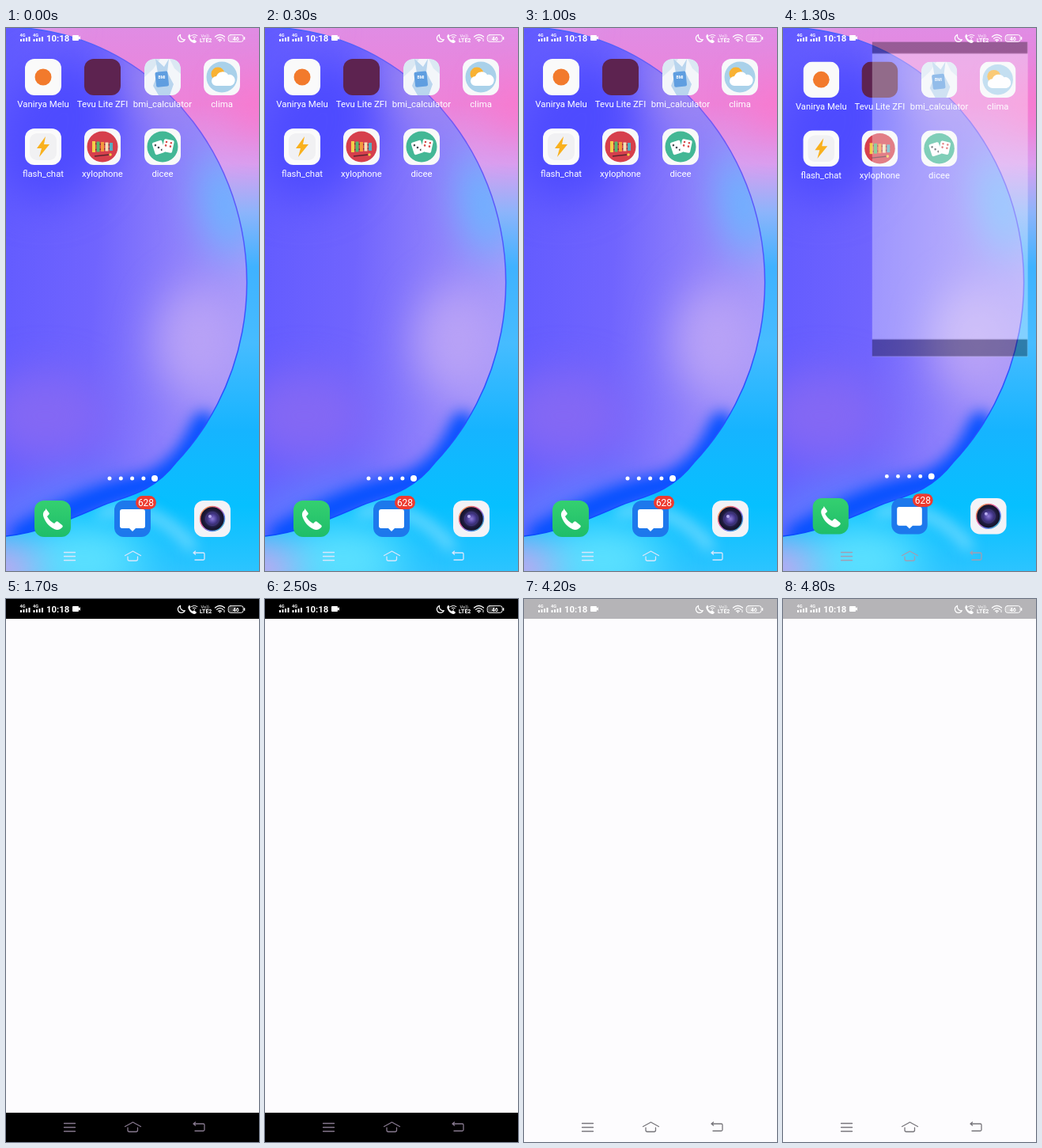
An HTML page for the animation above (5000 ms loop, 320 px wide and 686 px high).

```html
<!DOCTYPE html>
<html lang="en">
<head>
<meta charset="utf-8">
<title>App launch</title>
<style>
  html, body { margin: 0; width: 100%; height: 100%; overflow: hidden; background: #fdfcfe; }
  svg { display: block; width: 100vw; height: 100vh; font-family: Roboto, "Open Sans", sans-serif; }

  .labels { font-size: 11.4px; fill: #fff; text-anchor: middle; }
  .line { fill: none; stroke-linecap: round; stroke-linejoin: round; }

  .shell, .window, .bars, .nav { animation: 5s linear infinite; }
  .shell { animation-name: shrink; transform-origin: 160px 343px; }
  .window { animation-name: open, appear; }
  .bars { animation-name: lighten; }
  .nav { animation-name: tint; }

  @keyframes shrink {
    0%, 24.2% { transform: scale(1); animation-timing-function: cubic-bezier(.33, 1, .68, 1); }
    32%, 100% { transform: scale(.979); }
  }
  @keyframes open {
    0%, 24.2% {
      transform: translate(250px, 39px) scale(.144, .067);
      animation-timing-function: cubic-bezier(.33, 1, .68, 1);
    }
    32%, 100% { transform: translate(0, 0) scale(1, 1); }
  }
  @keyframes appear {
    0%, 24% { opacity: 0; }
    30%, 100% { opacity: 1; }
  }
  @keyframes lighten {
    0%, 61.6% { opacity: 1; }
    67.2%, 100% { opacity: 0; }
  }
  @keyframes tint {
    0%, 24% { stroke: #d9e6fb; }
    27%, 61.6% { stroke: #87798f; }
    67.2%, 100% { stroke: #77757b; }
  }
</style>
</head>
<body>
<svg viewBox="0 0 320 686" preserveAspectRatio="none">
  <defs>
    <linearGradient id="sky" x2="0" y2="1">
      <stop offset="0" stop-color="#e08ce4"/>
      <stop offset=".14" stop-color="#ee82d8"/>
      <stop offset=".25" stop-color="#d99ff0"/>
      <stop offset=".34" stop-color="#8cb4fb"/>
      <stop offset=".44" stop-color="#3fb2ff"/>
      <stop offset=".58" stop-color="#46bcff"/>
      <stop offset=".74" stop-color="#16b4ff"/>
      <stop offset=".88" stop-color="#06c0ff"/>
      <stop offset="1" stop-color="#2cc4ff"/>
    </linearGradient>
    <linearGradient id="glow" x2="1" y2=".12">
      <stop offset="0" stop-color="#625bff"/>
      <stop offset=".4" stop-color="#7064fe"/>
      <stop offset=".75" stop-color="#9283fb"/>
      <stop offset="1" stop-color="#a999fa"/>
    </linearGradient>
    <linearGradient id="rim" x2="0" y2="1">
      <stop offset="0" stop-color="#3f62ff"/>
      <stop offset=".12" stop-color="#7d5af2"/>
      <stop offset=".45" stop-color="#4c58ff"/>
      <stop offset="1" stop-color="#0a4cff"/>
    </linearGradient>
    <radialGradient id="lens">
      <stop offset="0" stop-color="#8f7bd8"/>
      <stop offset=".35" stop-color="#4b3d94"/>
      <stop offset=".7" stop-color="#1d1a3c"/>
      <stop offset="1" stop-color="#111222"/>
    </radialGradient>
    <linearGradient id="ring" x2="1" y2="1">
      <stop offset="0" stop-color="#f6b23c"/>
      <stop offset=".4" stop-color="#e65a9c"/>
      <stop offset=".7" stop-color="#5a7cf0"/>
      <stop offset="1" stop-color="#44d0b0"/>
    </linearGradient>
    <linearGradient id="call" x2="0" y2="1">
      <stop offset="0" stop-color="#34d070"/>
      <stop offset="1" stop-color="#1fbd6a"/>
    </linearGradient>
    <filter id="soft" filterUnits="userSpaceOnUse" x="-100" y="-100" width="520" height="886" color-interpolation-filters="sRGB">
      <feGaussianBlur stdDeviation="26"/>
    </filter>
    <filter id="fine" filterUnits="userSpaceOnUse" x="-100" y="-100" width="520" height="886" color-interpolation-filters="sRGB">
      <feGaussianBlur stdDeviation="9"/>
    </filter>
    <path id="orb" d="M0-1A305 322 0 0 1 215 549C185 588 150 592 125 602S50 637 0 642"/>
    <clipPath id="disc"><use href="#orb"/></clipPath>
    <clipPath id="round"><rect x="-23" y="-23" width="46" height="46" rx="12"/></clipPath>
    <rect id="tile" x="-23" y="-23" width="46" height="46" rx="12"/>
    <path id="handset" d="M-9-11c-3 2-4 5-2 10 3 7 7 11 13 14 4 2 7 1 10-2 1-1 1-2 0-3l-5-4c-1-1-2-1-3 0l-2 2c-4-2-7-5-9-9l2-2c1-1 1-2 0-3l-3-4c0-1-1-1-1 1z"/>
    <g id="signal">
      <text y="10.6" font-size="5.6" font-weight="700">4G</text>
      <path d="M.5 14h2v3h-2zM4 13.200h2V17H4zM7.500 12.200h2V17h-2zM11 11h2v6h-2z"/>
    </g>
  </defs>

  <!-- wallpaper -->
  <rect width="320" height="686" fill="url(#sky)"/>
  <g filter="url(#soft)">
    <ellipse cx="20" cy="0" rx="50" ry="14" fill="#d8b8fa"/>
    <ellipse cx="322" cy="100" rx="34" ry="34" fill="#fb78cc"/>
    <ellipse cx="100" cy="672" rx="75" ry="42" fill="#5fe2ff"/>
    <ellipse cx="-10" cy="685" rx="50" ry="36" fill="#d8a4ee"/>
  </g>
  <path class="line" d="M120 612Q185 596 235 655" stroke="#9be6ff" stroke-width="9" filter="url(#fine)"/>
  <g clip-path="url(#disc)">
    <rect width="320" height="686" fill="url(#glow)"/>
    <g filter="url(#soft)">
      <ellipse cx="65" cy="130" rx="70" ry="95" fill="#4e4bff" transform="rotate(25 65 130)"/>
      <ellipse cx="195" cy="80" rx="60" ry="30" fill="#a088f0" transform="rotate(42 195 80)"/>
      <ellipse cx="278" cy="225" rx="28" ry="65" fill="#62baff" transform="rotate(-12 278 225)"/>
      <ellipse cx="245" cy="395" rx="55" ry="70" fill="#b8a2f6"/>
      <ellipse cx="50" cy="490" rx="80" ry="55" fill="#8468f4"/>
      <ellipse cx="60" cy="600" rx="100" ry="22" fill="#5c84ff" transform="rotate(-15 60 600)"/>
    </g>
    <path class="line" d="M20 640Q110 590 165 580T250 500" stroke="#0450ff" stroke-width="30" filter="url(#fine)"/>
  </g>
  <use href="#orb" class="line" stroke="url(#rim)" stroke-width="1.5"/>

  <!-- home screen -->
  <g class="shell">
    <g transform="translate(47 62)">
      <use href="#tile" fill="#fafafa"/>
      <circle r="10.5" fill="#f27a2c"/>
    </g>
    <g transform="translate(122 62)"><use href="#tile" fill="#5d2350"/></g>
    <g transform="translate(198 62)" clip-path="url(#round)">
      <use href="#tile" fill="#dbe8f3"/>
      <path d="M-23 23V0l11-10 9-13H9l6 12 8 7v27z" fill="#f3f6fa"/>
      <path d="M-9-23l3 18-6 16 7 12H9l5-14-8-15 2-17-6 10z" fill="#b9d5ee"/>
      <rect x="-9" y="-7" width="16" height="19" rx="2" fill="#5f9ee0" transform="rotate(-6)"/>
      <text x="-1" y="2" font-size="5" font-weight="700" fill="#fff" text-anchor="middle">BMI</text>
    </g>
    <g transform="translate(273 62)">
      <use href="#tile" fill="#f7f8fa"/>
      <circle r="19.5" fill="#a9d1ea"/>
      <circle cx="-5" cy="-4" r="8.5" fill="#f9b233"/>
      <path d="M-7 11a6 6 0 0 1 0-12 8.5 8.5 0 0 1 15-2 7 7 0 0 1 3 14z" fill="#fff"/>
    </g>
    <g transform="translate(47 150)">
      <use href="#tile" fill="#fbfbfb"/>
      <rect x="-17" y="-17" width="34" height="34" rx="9" fill="#f1f1f3"/>
      <path d="M3-13L-8 2h6l-3 11L8-3H1z" fill="#f9b11e"/>
    </g>
    <g transform="translate(122 150)">
      <use href="#tile" fill="#f8f8f8"/>
      <circle r="19.5" fill="#d63f4c"/>
      <path d="M-13-4L13-2M-13 4L13 2" stroke="#7e2430" stroke-width="1.5"/>
      <g stroke-width="4">
        <path d="M-11-7V7" stroke="#f4ce48"/>
        <path d="M-5.500-6.500v13" stroke="#59b66c"/>
        <path d="M0-6V6" stroke="#f39a3c"/>
        <path d="M5.500-5.500v11" stroke="#f3e0b8"/>
        <path d="M11-5V5" stroke="#56aec0"/>
      </g>
      <path d="M-10 12L9 10" stroke="#5a2630" stroke-width="1.3"/>
      <circle cx="10" cy="10" r="1.8" fill="#f4ce48"/>
    </g>
    <g transform="translate(198 150)">
      <use href="#tile" fill="#f8f9f8"/>
      <circle r="19.5" fill="#43b795"/>
      <g transform="translate(-5 1) rotate(-18)">
        <rect x="-6.5" y="-8" width="13" height="16" rx="2" fill="#fff"/>
        <g fill="#454a50"><circle cx="-3" cy="-4" r="1.3"/><circle r="1.3"/><circle cx="3" cy="4" r="1.3"/></g>
      </g>
      <g transform="translate(7 -1) rotate(12)">
        <rect x="-6.5" y="-8" width="13" height="16" rx="2" fill="#fff"/>
        <path class="line" d="M-3-4.500v9M3-4.500v9" stroke="#d94a4a" stroke-width="2.6" stroke-dasharray="0 4.5"/>
      </g>
    </g>
    <g class="labels">
      <text x="47" y="100">Vanirya Melu</text>
      <text x="122" y="100">Tevu Lite ZFI</text>
      <text x="198" y="100">bmi_calculator</text>
      <text x="273" y="100">clima</text>
      <text x="47" y="188">flash_chat</text>
      <text x="122" y="188">xylophone</text>
      <text x="198" y="188">dicee</text>
    </g>

    <path class="line" d="M131 569h44" stroke="#fff" stroke-width="5" stroke-dasharray="0 14.3"/>
    <circle cx="188" cy="569" r="4" fill="#fff"/>

    <g transform="translate(59 620)">
      <use href="#tile" fill="url(#call)"/>
      <use href="#handset" fill="#fff"/>
    </g>
    <g transform="translate(160 620)">
      <use href="#tile" fill="#1d78ec"/>
      <path d="M-13-12h26q3 0 3 3V9q0 3-3 3H4l-4 4-4-4h-9q-3 0-3-3V-9q0-3 3-3z" fill="#fff"/>
    </g>
    <rect x="164" y="591" width="26" height="17" rx="8.5" fill="#ee3b30"/>
    <text x="177" y="604" font-size="12" fill="#fff" text-anchor="middle">628</text>
    <g transform="translate(261 620)">
      <use href="#tile" fill="#f3f3f7"/>
      <circle r="15.5" fill="url(#lens)" stroke="url(#ring)" stroke-width="1.5"/>
      <circle r="8.5" fill="none" stroke="#41387c"/>
      <circle cx="-3" cy="-3" r="2" fill="#b9aef0"/>
    </g>
  </g>

  <!-- app window -->
  <g class="window">
    <rect width="320" height="686" fill="#fdfcfe"/>
    <rect width="320" height="25" fill="#b5b4b7"/>
    <path class="bars" d="M0 0h320v25H0zM0 649h320v37H0z"/>
  </g>

  <!-- status bar -->
  <g fill="#fff">
    <use href="#signal" x="17.5"/>
    <use href="#signal" x="34"/>
    <text x="51" y="17" font-size="11.4" font-weight="700">10:18</text>
    <path d="M85 9h6q1 0 1 1v1.500l2-1.200v4.400l-2-1.200V15q0 1-1 1h-6q-1 0-1-1v-5q0-1 1-1z"/>
    <path class="line" d="M220.500 8.500a4.600 4.600 0 1 0 5.700 6.200 5 5 0 0 1-5.700-6.200z" stroke="#fff" stroke-width="1.3"/>
    <use href="#handset" transform="translate(235.5 13) scale(.43)"/>
    <path class="line" d="M234.500 9.500q4-2.500 7.500 0M236.300 11.500q2-1.200 4 0" stroke="#fff"/>
    <circle cx="238.3" cy="13.3" r=".8"/>
    <text x="246.5" y="11.5" font-size="5.6">Vo))</text>
    <text x="245" y="18" font-size="7" font-weight="700">LTE2</text>
    <path class="line" d="M264.500 11q6-5 12 0M266.600 13.200q4-3 8 0M268.500 15.200q2-1.300 4 0" stroke="#fff" stroke-width="1.3"/>
    <circle cx="270.5" cy="16.5" r="1"/>
    <path d="M275.500 17v-3.500h1V17z"/>
    <rect x="282" y="9.5" width="9" height="7" rx="1.5" opacity=".22"/>
    <rect class="line" x="281.2" y="8.7" width="19" height="8.6" rx="2.8" stroke="#fff"/>
    <path d="M301 11.200h1.300v3.600H301z"/>
    <text x="290.7" y="15.6" font-size="7" font-weight="700" text-anchor="middle">46</text>
  </g>

  <!-- navigation -->
  <g class="nav line" stroke-width="1.3">
    <path d="M73.500 662.500h14M73.500 667.500h14M73.500 672.500h14"/>
    <path d="M150.500 666.500l10-5.500 10 5.500M154 668v3q0 2 2 2h8.500q2 0 2-2v-3"/>
    <path d="M239.500 661l-2.500 2 2.500 2M237 663h12.500q1.500 0 1.500 1.500v6q0 1.500-1.500 1.500H239"/>
  </g>
</svg>
</body>
</html>
```
